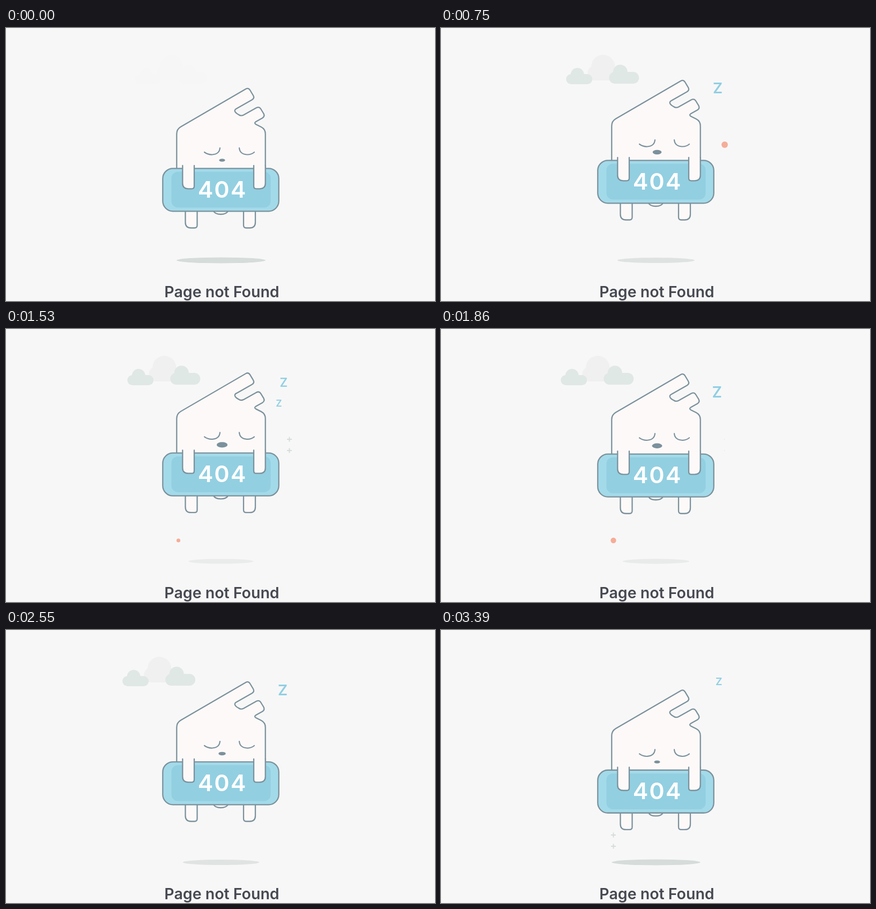
Write an HTML page that moves like this. It is 800 by 510 pixels and loops after 3.42 s.

```html
<!DOCTYPE html>
<html lang="en">
<head>
<meta charset="utf-8">
<title>Page not Found</title>
<style>
  html, body { margin: 0; width: 100%; height: 100%; overflow: hidden; background: #f7f7f7; }
  svg { display: block; width: 800px; height: 510px; }
  text { text-anchor: middle; font-family: Inter, sans-serif; font-weight: 600; }
  .line { fill: #fdf9f9; stroke: #7b919c; stroke-width: 2.3; stroke-linecap: round; stroke-linejoin: round; }
  .flat { stroke: none; }
</style>
</head>
<body>
<svg viewBox="0 0 800 510">
  <g id="clouds">
    <path fill="#f0f0f0" d="M289 98a14 14 0 0 1-6-26a22 22 0 0 1 44 0a13 13 0 0 1-7 26z"/>
    <g fill="#e0e8e6">
      <circle cx="257" cy="87" r="12.5"/>
      <rect x="236" y="86" width="49" height="19" rx="9.5"/>
      <circle cx="337" cy="82" r="13.5"/>
      <rect x="316" y="82" width="56" height="22" rx="11"/>
    </g>
  </g>
  <ellipse id="shadow" cx="401" cy="434" fill="#d5dcda"/>

  <g id="character" class="line">
    <path d="M387 342Q390 348 400.5 348Q411 348 414 342"/>
    <path d="M334.5 341V363Q334.5 373.5 345 373.5H351.5Q356.5 373.5 356.5 368.5V341"/>
    <path d="M465 341V363Q465 373.5 454.5 373.5H448Q443 373.5 443 368.5V341"/>
    <path d="M318.3 264V198Q318.3 189 326 184.5L447 114Q452 111 455 116L461 126
      Q464 131 459 134L430 150.5Q425 153 427.5 157Q429 159.5 434 162Q438 165 443 162.5
      L467 149Q472 146.5 475 151L480.5 160Q483 165 478.5 168L466 175Q462 177.5 466 180
      L476 185Q483.7 189 483.7 198V264"/>
    <g fill="none" stroke-width="2.2">
      <path d="M370 232Q377 237 385 236.5Q398 235.5 399 224"/>
      <path d="M435 224Q436 235.5 449 236.5Q457 237 463 232"/>
    </g>
    <ellipse id="nose" class="flat" cx="403" cy="247" fill="#7b919c"/>
    <rect x="292.3" y="262.3" width="216.4" height="80" rx="19" fill="#a3dae9"/>
    <rect class="flat" x="308.5" y="268.5" width="185" height="67" rx="12" fill="#92cfe1"/>
    <text class="flat" x="403.5" y="317" font-size="43" letter-spacing="2" fill="#fff">404</text>
    <path d="M329.3 257V290Q329.3 300.3 340 300.3H346.5Q351 300.3 351 295.5V257"/>
    <path d="M483.7 257V290Q483.7 300.3 473 300.3H466.5Q462 300.3 462 295.5V257"/>
  </g>

  <g id="particles"></g>
  <text x="402.5" y="503" font-size="28.5" fill="#464951">Page not Found</text>
</svg>
<script>
const LOOP = 3420, PEAK = 1640, HEIGHT = 32.8;
const PULSE = 480;

const dotSpots = [[529, 218], [271, 250.5], [321.5, 395]];

// Pluses twinkle on a steady beat; a gap splits one into an upper and a lower plus.
const twinkles = [
  { beat: 0, x: 528.5, y: 352, size: 5.5, gap: 0 },
  { beat: 2, x: 528.5, y: 216.5, size: 5, gap: 10.5 },
  { beat: 3, x: 528, y: 372.5, size: 4.5, gap: 0 },
  { beat: 4, x: 529, y: 364, size: 8.5, gap: 0 },
  { beat: 5, x: 321.5, y: 393.5, size: 4.5, gap: 10.5 },
];

const clamp = v => Math.max(0, Math.min(1, v));
const swell = p => Math.sqrt(Math.sin(Math.PI * clamp(p)));
const repeat = (count, make) => Array.from({ length: count }, (_, i) => make(i)).join('');

function set(id, attributes) {
  const element = document.getElementById(id);
  for (const name in attributes) element.setAttribute(name, attributes[name]);
}

function letter(t, i) {
  const p = (t - 220 - 600 * i) / 910;
  if (p <= 0 || p >= 1) return '';
  const size = 20.5 * swell(p);
  const x = 506.5 + 12 * Math.sin(p * Math.PI / 2);
  const y = 146 - 59 * p + size / 2;
  return `<text x="${x}" y="${y}" font-size="${size / 0.727}" fill="#8fcfe3" opacity="${clamp(size / 12)}">Z</text>`;
}

function dot(t, i) {
  const [x, y] = dotSpots[i % dotSpots.length];
  const r = 6.5 * swell((t - 424 - 530 * i) / PULSE);
  return `<circle cx="${x}" cy="${y}" r="${r}" fill="#f5ad98"/>`;
}

function plus(x, y, h) {
  return `<path d="M${x - h} ${y}h${2 * h}M${x} ${y - h}v${2 * h}" stroke="#d5dcda" stroke-width="${h * 0.44}"/>`;
}

function twinkle(t, { beat, x, y, size, gap }) {
  const h = size * swell((t - 210 - 588 * beat) / PULSE);
  if (h < 0.01) return '';
  return gap ? plus(x, y - gap, h) + plus(x, y + gap, h) : plus(x, y, h);
}

function draw(now) {
  const t = now % LOOP;
  const rise = HEIGHT * Math.min(t / PEAK, (LOOP - t) / (LOOP - PEAK));
  const nose = 7.7 - 2.35 * Math.cos(2 * Math.PI * (t + 250) / LOOP);

  set('character', { transform: `translate(0 ${-rise})` });
  set('nose', { rx: nose, ry: nose / 2 });
  set('shadow', { rx: 83 - rise * 0.735, ry: 5.5 - rise * 0.03, opacity: 1 - rise * 0.019 });
  set('clouds', {
    transform: `translate(${(450 - t) * 0.009} 0)`,
    opacity: clamp(Math.min(t, 3390 - t) / 450),
  });

  document.getElementById('particles').innerHTML =
    repeat(5, i => letter(t, i)) +
    repeat(4, i => dot(t, i)) +
    twinkles.map(item => twinkle(t, item)).join('');
  requestAnimationFrame(draw);
}
requestAnimationFrame(draw);
</script>
</body>
</html>
```
